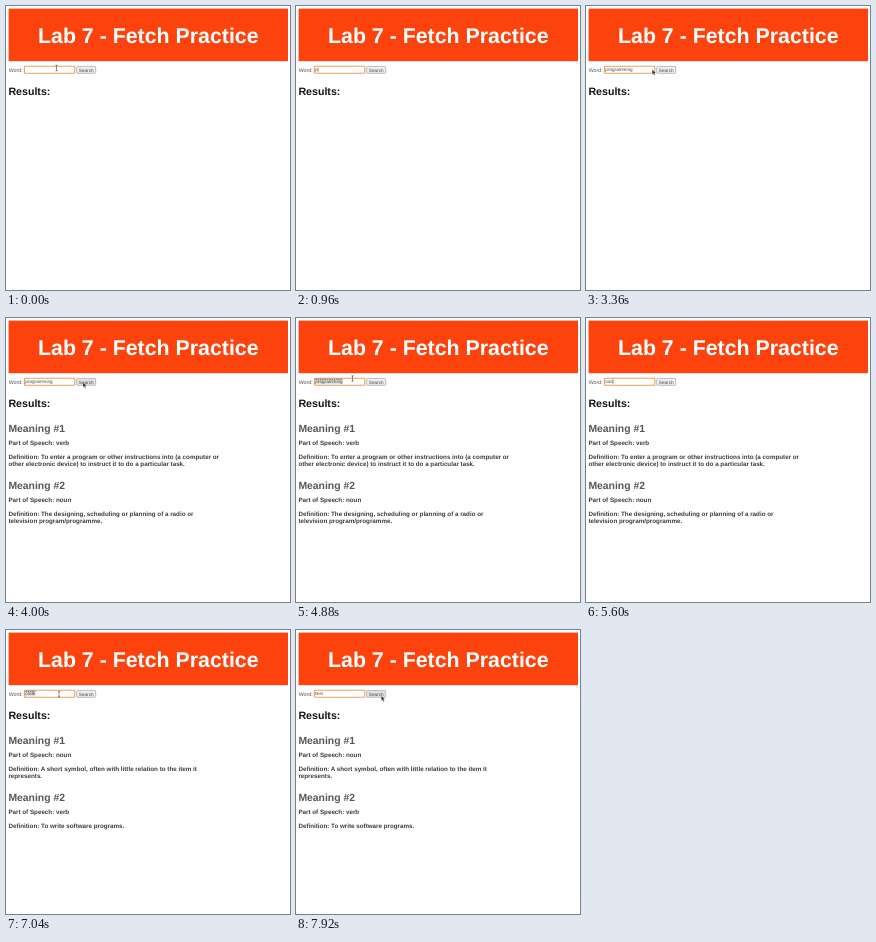
An HTML page that plays this animation: 284x284 px, repeating every 8000 ms.

```html
<!DOCTYPE html>
<html lang="en">
<head>
<meta charset="utf-8">
<title>Lab 7 - Fetch Practice</title>
<style>
  html, body { margin: 0; width: 100%; height: 100%; overflow: hidden; background: #fff; }
  svg { display: block; width: 100%; height: 100%; }
  text { font-family: "Liberation Sans", Arial, sans-serif; text-rendering: geometricPrecision; white-space: pre; }
  .bold { font-weight: 700; }
  .head { font-size: 10.4px; font-weight: 700; fill: #585858; }
  .line { font-size: 6.25px; font-weight: 700; fill: #3c3c3c; }
  .small { font-size: 4.65px; fill: #444; }
</style>
</head>
<body>
<svg viewBox="0 0 284 284">
  <rect x="2.6" y="2.6" width="279.4" height="52.6" fill="#fd430d"/>
  <text class="bold" x="142.3" y="36.8" font-size="21.35" fill="#fff" text-anchor="middle">Lab 7 - Fetch Practice</text>
  <text x="2.7" y="65.9" font-size="5.3" fill="#555">Word:</text>
  <rect x="18.4" y="60.3" width="50.4" height="7" rx=".7" fill="#fff" stroke="#e8a35c" stroke-width="1.1"/>
  <g id="mark">
    <rect id="fill" x="19.3" y="61" height="5.6" fill="#dfe3ea"/>
    <path id="edge" stroke="#555" stroke-width=".9" stroke-dasharray="1.6 .7"/>
  </g>
  <text id="word" class="small" x="19.3" y="65.4"></text>
  <path id="caret" d="M0 61.5V66.2" stroke="#333" stroke-width=".4"/>
  <rect id="button" x="70.7" y="60.4" width="19" height="6.9" rx=".7" stroke="#999" stroke-width=".6"/>
  <text class="small" x="80.2" y="65.5" text-anchor="middle">Search</text>
  <text class="bold" x="2.4" y="89.2" font-size="10.65" fill="#151515">Results:</text>
  <g id="results"></g>
  <path id="beam" d="M-1.1 -2.7H1.1M0 -2.7V2.7M-1.1 2.7H1.1" fill="none" stroke="#444" stroke-width=".6"/>
  <path id="arrow" d="M0 0V5L1.2 4L2 5.9L3 5.4L2.2 3.6H3.7Z" fill="#222" stroke="#fff" stroke-width=".35"/>
</svg>
<script>
const LOOP = 8000;
const $ = id => document.getElementById(id);

const answers = [
  { at: 4000, items: [
    ["verb", "To enter a program or other instructions into (a computer or", "other electronic device) to instruct it to do a particular task."],
    ["noun", "The designing, scheduling or planning of a radio or", "television program/programme."]] },
  { at: 6640, items: [
    ["noun", "A short symbol, often with little relation to the item it", "represents."],
    ["verb", "To write software programs."]] }
];

// Word, key times, and when it gets selected
const typed = [
  { word: "programming", keys: [960, 1200, 1400, 1600, 1800, 2000, 2160, 2320, 2440, 2560, 2680], select: 4800 },
  { word: "code", keys: [5280, 5440, 5600, 5760], select: 6960 },
  { word: "test", keys: [7280, 7400, 7480, 7600], select: Infinity }
];

// Pointer stops: time, x, y
const stops = [
  [0, 50.5, 62], [800, 50.5, 62], [2960, 52, 63], [3360, 66.2, 63.4],
  [3600, 77, 64.3], [4240, 77, 64.3], [4720, 56.5, 60.5], [5840, 56.5, 60.5],
  [6160, 76, 64.3], [6640, 76, 64.3], [6960, 53, 64], [7600, 53, 64],
  [7920, 85.3, 65.8], [8000, 85.3, 65.8]
];
const hidden = [[960, 2960], [5280, 5840], [7280, 7600]];
const clicks = [[3760, 3920], [6400, 6560]];

const within = (list, t) => list.some(([a, b]) => t >= a && t < b);
const show = (el, on) => { el.style.display = on ? "" : "none"; };

function addText(group, cls, y, value) {
  const el = document.createElementNS("http://www.w3.org/2000/svg", "text");
  el.setAttribute("class", cls);
  el.setAttribute("x", 2.4);
  el.setAttribute("y", y);
  el.textContent = value;
  group.append(el);
}

const groups = answers.map(({ items }) => {
  const group = document.createElementNS("http://www.w3.org/2000/svg", "g");
  items.forEach(([part, first, second], i) => {
    const y = 113.8 + i * 57;
    addText(group, "head", y, "Meaning #" + (i + 1));
    addText(group, "line", y + 13.6, "Part of Speech: " + part);
    addText(group, "line", y + 27.2, "Definition: " + first);
    if (second) addText(group, "line", y + 34.4, second);
  });
  $("results").append(group);
  return group;
});

function pointerAt(t) {
  const i = Math.max(1, stops.findIndex(s => s[0] > t));
  const [t0, x0, y0] = stops[i - 1], [t1, x1, y1] = stops[i];
  const p = (t - t0) / (t1 - t0), e = p * p * (3 - 2 * p);
  return [x0 + (x1 - x0) * e, y0 + (y1 - y0) * e];
}

function drawField(t) {
  const entry = typed.filter(e => t >= e.keys[0]).pop();
  const count = entry ? entry.keys.filter(k => k <= t).length : 0;
  $("word").textContent = entry ? entry.word.slice(0, count) : "";
  const width = count ? $("word").getComputedTextLength() : 0;
  const selected = !!entry && t >= entry.select;
  show($("mark"), selected);
  $("fill").setAttribute("width", width);
  $("edge").setAttribute("d", `M19.3 61.2h${width}`);
  show($("caret"), !selected && within(hidden, t));
  $("caret").setAttribute("transform", `translate(${19.6 + width} 0)`);
}

function drawPointer(t) {
  const [x, y] = pointerAt(t);
  const inField = x < 65;
  const visible = !within(hidden, t);
  show($("beam"), visible && inField);
  show($("arrow"), visible && !inField);
  for (const id of ["beam", "arrow"]) $(id).setAttribute("transform", `translate(${x} ${y})`);
  const over = x > 70.5 && visible;
  $("button").setAttribute("fill", within(clicks, t) ? "#d4d4d4" : over ? "#e3e3e3" : "#efefef");
}

function draw(now) {
  const t = now % LOOP;
  drawField(t);
  drawPointer(t);
  const current = answers.filter(a => t >= a.at).length - 1;
  groups.forEach((g, i) => show(g, i === current));
  requestAnimationFrame(draw);
}
draw(performance.now());
</script>
</body>
</html>
```
